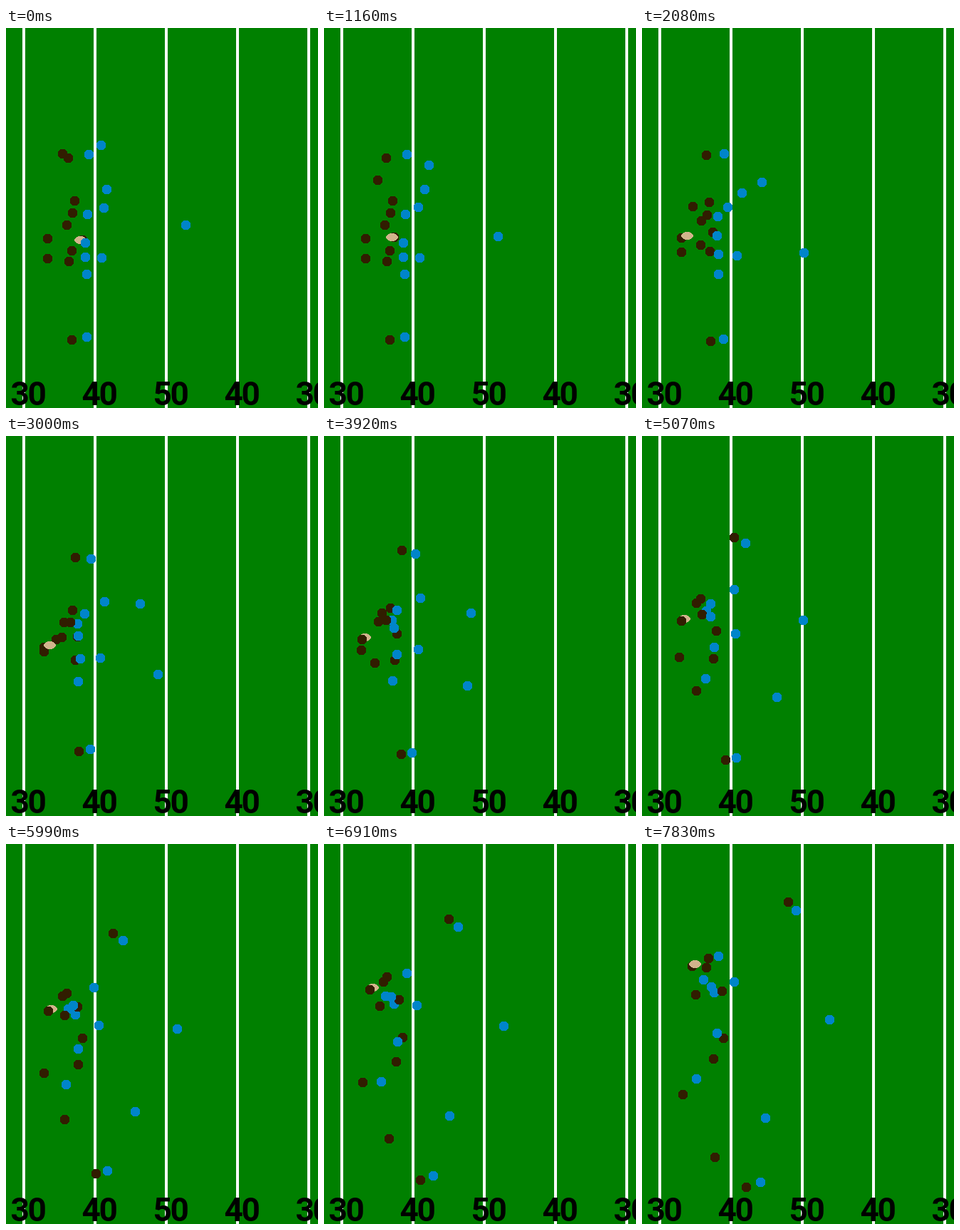
Recreate the animation shown at these times as an HTML page. Size 438 px wide and 533 px high, loop 8000 ms.

```html
<!DOCTYPE html>
<html lang="en">
<head>
<meta charset="utf-8">
<title>Football play</title>
<style>
  html, body { margin: 0; width: 100%; height: 100%; overflow: hidden; background: #008000; }
  svg { display: block; width: 438px; height: 533px; }
  text { font: bold 46px Roboto, "Liberation Sans", sans-serif; letter-spacing: -2.4px; }
</style>
</head>
<body>
<svg id="field" viewBox="0 0 438 533" shape-rendering="crispEdges"></svg>
<script>
const field = document.getElementById("field");
const LOOP = 8000, FIRST_HOLD = 240, STEP = 230;
const SNAP = 5, LAST = 34;

// Each route is a quadratic curve run from the snap: start, control, end.
// A leading fourth point is where a player shifts from before the snap.
const offence = {
  topReceiver: "87,182 90,172 205,81",
  motionReceiver: "79,176 75,213 58,349 102,439",
  bottomReceiver: "92,437 106,441 146,481",
  pullingGuard: "85,276 74,260 93,160",
  center: "107,297 98,293 100,267 114,272",
  rightGuard: "92,312 103,319 100,301",
  pullingTackle: "88,327 62,244 90,173",
  leftGuard: "93,259 88,274 75,211",
  leftTackle: "96,242 85,253 112,206",
  quarterback: "58,295 46,286 57,351",
  runner: "58,323 44,299 70,171",
};
const defence = {
  topCorner: "116,177 105,181 216,93",
  nickel: "133,164 147,192 227,289 263,246",
  topLinebacker: "141,226 141,253 107,157",
  middleLinebacker: "134,322 131,320 129,193",
  bottomTackle: "111,321 95,310 105,265",
  bottomEnd: "113,345 90,346 76,329",
  bottomCorner: "113,433 115,441 166,474",
  safety: "252,276 244,292 180,380 173,384",
  topTackle: "114,261 84,279 86,190",
  noseTackle: "111,301 88,267 101,208",
  topEnd: "137,252 132,251 83,255 97,200",
};
// Players who overlap in the scrum, back to front.
const SCRUM = ["topTackle", "leftGuard", "noseTackle", "leftTackle", "topEnd"];

function add(tag, attributes, text = "") {
  const node = document.createElementNS("http://www.w3.org/2000/svg", tag);
  for (const [name, value] of Object.entries(attributes)) node.setAttribute(name, value);
  node.textContent = text;
  return field.appendChild(node);
}

const mix = (a, b, u) => a.map((value, axis) => value + (b[axis] - value) * u);
const shift = (point, dx, dy) => [point[0] + dx, point[1] + dy];
const progress = (step, from, to) => Math.min(1, Math.max(0, (step - from) / (to - from)));

function route(path) {
  const points = path.split(" ").map(point => point.split(",").map(Number));
  const [start, control, end] = points.slice(-3);
  return step => {
    if (step < SNAP) return mix(points[0], start, step / SNAP);
    const u = progress(step, SNAP, LAST);
    return mix(mix(start, control, u), mix(control, end, u), u);
  };
}

function place(node, [x, y]) {
  node.setAttribute("transform", `translate(${Math.round(x) + 0.5} ${Math.round(y) + 0.5})`);
}

["30", "40", "50", "40", "30"].forEach((label, i) => {
  add("rect", { x: 23 + i * 100, y: 0, width: 4, height: 533, fill: "#fff" });
  add("text", { x: 6.5 + i * 100, y: 529 }, label);
});

const OCTAGON = "-2.9,-6.5 2.9,-6.5 6.5,-2.9 6.5,2.9 2.9,6.5 -2.9,6.5 -6.5,2.9 -6.5,-2.9";
const players = {};
const routes = { ...offence, ...defence };
const others = Object.keys(routes).filter(name => !SCRUM.includes(name));
for (const name of [...others, ...SCRUM]) {
  const fill = name in offence ? "#311d00" : "#0085ca";
  players[name] = { node: add("polygon", { points: OCTAGON, fill }), at: route(routes[name]) };
}
const ball = add("ellipse", { rx: 8.5, ry: 5.5, fill: "tan" });

// The ball goes from the center to the quarterback, then to the runner.
function ballAt(step) {
  const { center, quarterback, runner } = players;
  const snapped = mix(
    shift(center.at(Math.min(step, SNAP)), -3, 0),
    shift(quarterback.at(step), 8, -3),
    progress(step, SNAP, SNAP + 4));
  return mix(snapped, shift(runner.at(step), 4, -3), progress(step, 13, 17));
}

function draw() {
  const time = performance.now() % LOOP;
  const step = time < FIRST_HOLD ? 0 : 1 + Math.floor((time - FIRST_HOLD) / STEP);
  for (const { node, at } of Object.values(players)) place(node, at(step));
  place(ball, ballAt(step));
  const tucked = step > 14 && step < LAST - 1;
  players.runner.node[tucked ? "before" : "after"](ball);
  requestAnimationFrame(draw);
}
draw();
</script>
</body>
</html>
```
